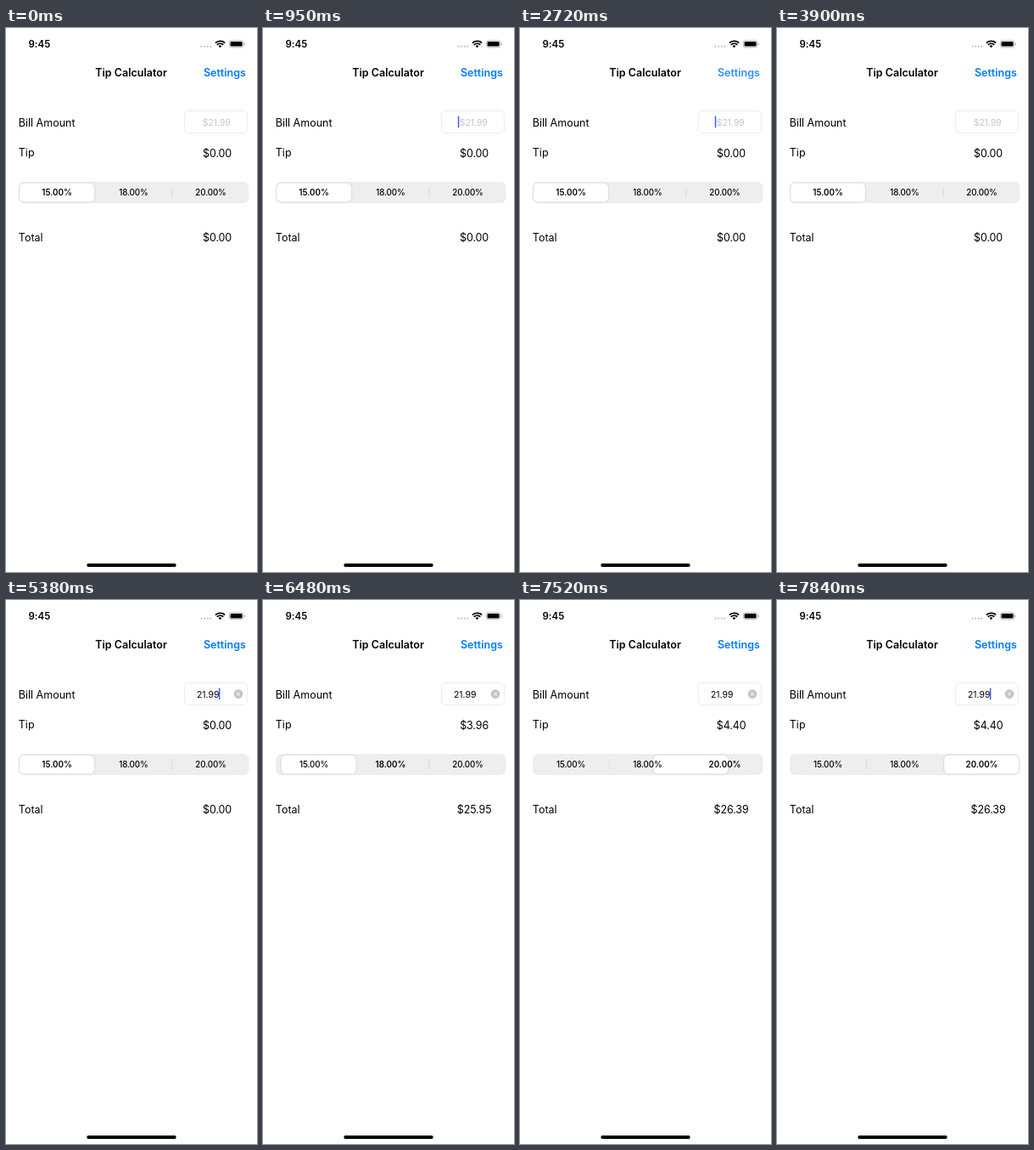
Write an HTML page that moves like this. It is 296x640 px and loops after 8000 ms.

```html
<!DOCTYPE html>
<html lang="en">
<head>
<meta charset="utf-8">
<title>Tip Calculator</title>
<style>
  html, body { margin: 0; width: 100%; height: 100%; overflow: hidden; background: #fff; }
  svg { display: block; width: 296px; height: 640px; }
  text { font: 400 12.5px Inter, sans-serif; }
  .semi { font-weight: 600; letter-spacing: .03px; }
  .mid { text-anchor: middle; }
  .value { letter-spacing: -.12px; }
  .small { font-size: 10.4px; }
  .seg { font-size: 9.8px; font-weight: 500; letter-spacing: -.13px; }
  .seg.on { font-weight: 600; letter-spacing: 0; }
  #thumb { filter: drop-shadow(0 .7px 1px rgba(0, 0, 0, .2)); }
</style>
</head>
<body>
<svg viewBox="0 0 296 640">
  <!-- status bar -->
  <text class="semi" x="26.4" y="23" style="font-size:11.5px">9:45</text>
  <g fill="#b8b8b8">
    <circle cx="230.5" cy="21.8" r="1"/><circle cx="234.2" cy="21.8" r="1"/>
    <circle cx="237.8" cy="21.8" r="1"/><circle cx="241.3" cy="21.8" r="1"/>
  </g>
  <g fill="none" stroke="#000" stroke-width="1.8">
    <path d="M246.9 17.6a8 8 0 0 1 11.2 0M248.8 19.8a5.3 5.3 0 0 1 7.4 0"/>
    <path d="M252.5 23.2l-1.9-1.9a2.7 2.7 0 0 1 3.8 0z" fill="#000" stroke="none"/>
  </g>
  <rect x="263.4" y="14.8" width="16.4" height="8" rx="2.4" fill="none" stroke="#a5a5a5" stroke-width=".8"/>
  <rect x="264.6" y="16" width="14" height="5.6" rx="1.4"/>
  <path d="M280.8 17.4q1.2 .3 1.2 1.4t-1.2 1.4z" fill="#a5a5a5"/>

  <text class="semi mid" x="147.6" y="56.7">Tip Calculator</text>
  <text class="semi" id="settings" x="232.9" y="56.7" fill="#007aff">Settings</text>

  <text x="14.8" y="115.7">Bill Amount</text>
  <text x="14.8" y="150.7">Tip</text>
  <text x="14.8" y="250.7">Total</text>
  <text class="value mid" id="tip" x="249.1" y="151.6"></text>
  <text class="value mid" id="total" x="249.1" y="250.7"></text>

  <!-- bill field -->
  <rect x="210.5" y="97.5" width="74" height="26" rx="4.5" fill="#fff" stroke="#eaeaea" stroke-width=".9"/>
  <text class="small mid" id="hint" x="248.3" y="114.7" fill="#c5c5c7">$21.99</text>
  <text class="small mid" id="bill" x="238.2" y="114.7"></text>
  <rect id="cursor" y="103.5" width="1.5" height="14" rx=".7" fill="#4258f5"/>
  <g id="clear">
    <circle cx="274" cy="110.6" r="5.3" fill="#c4c4c6"/>
    <path d="M272.1 108.7l3.8 3.8m0-3.8l-3.8 3.8" stroke="#fff" stroke-width="1" stroke-linecap="round"/>
  </g>

  <!-- segmented control -->
  <rect x="15" y="181" width="271.5" height="25" rx="6.5" fill="#eeeeef"/>
  <path id="sepLeft" d="M105.3 187.5v12" stroke="#d6d6d9" stroke-width=".9"/>
  <path id="sepRight" d="M196 187.5v12" stroke="#d6d6d9" stroke-width=".9"/>
  <rect id="thumb" y="182.5" width="88" height="22" rx="5.3" fill="#fff"/>
  <text class="seg mid" x="60" y="197.2">15.00%</text>
  <text class="seg mid" x="150.4" y="197.2">18.00%</text>
  <text class="seg mid" x="241.5" y="197.2">20.00%</text>

  <rect x="95.3" y="630.1" width="105.4" height="3.8" rx="1.9"/>
</svg>
<script>
const LOOP = 8000, STEP = 110;
const el = id => document.getElementById(id);
const segs = [...document.querySelectorAll('.seg')];

// [start ms, value held until the next entry]
const typed = [[0, ''], [4030, '2'], [4880, '21'], [5200, '21.9'], [5380, '21.99']];
const caret = [[0, 0], [830, .9], [950, 1], [1190, .5], [1310, 0], [1840, .9], [1960, 1],
  [2200, .5], [2320, 0], [2610, 1], [3140, .5], [3250, 0], [4030, 1], [4650, 0], [4880, 1],
  [5890, .5], [6010, 0], [6580, .9], [6700, 1], [6930, .5], [7040, 0], [7560, .9], [7680, 1]];
const link = [[0, 1], [1840, .2], [2500, .45], [2610, .65], [2720, .82], [2830, .93], [2940, 1]];
const tips = ['$0.00', '$3.96', '$4.40'];
const totals = ['$0.00', '$25.95', '$26.39'];
const taps = [{ press: 6250, release: 6470 }, { press: 7290, release: 7400 }];

const held = (track, t) => track.findLast(([start]) => t >= start)[1];

// Critically damped slide, advanced in steps
function slide(t, start) {
  if (t < start) return 0;
  const x = (Math.floor((t - start) / STEP) * STEP + 30) * .0134;
  const p = 1 - (1 + x) * Math.exp(-x);
  return p > .98 ? 1 : p;
}

function draw(t) {
  const text = held(typed, t);
  const selected = taps.filter(tap => t >= tap.release).length;
  const pos = taps.reduce((sum, tap) => sum + slide(t, tap.release), 0);

  el('settings').style.opacity = held(link, t);
  el('bill').textContent = text;
  el('hint').style.opacity = text ? 0 : 1;
  el('clear').style.opacity = text ? 1 : 0;
  const x = text ? 237.7 + el('bill').getComputedTextLength() / 2 : 229.8;
  el('cursor').setAttribute('x', x);
  el('cursor').style.opacity = held(caret, t);

  el('tip').textContent = tips[selected];
  el('total').textContent = totals[selected];
  el('thumb').setAttribute('x', 16 + pos * 90.6);
  el('sepLeft').style.opacity = Math.max(0, pos - 1);
  el('sepRight').style.opacity = Math.max(0, 1 - pos);
  segs.forEach((seg, i) => {
    const tap = taps[i - 1];
    const pressed = tap && t >= tap.press && t < tap.release;
    seg.classList.toggle('on', i === selected);
    seg.style.opacity = pressed ? .3 : 1;
  });
}

function tick() {
  draw(performance.now() % LOOP);
  requestAnimationFrame(tick);
}
tick();
</script>
</body>
</html>
```
